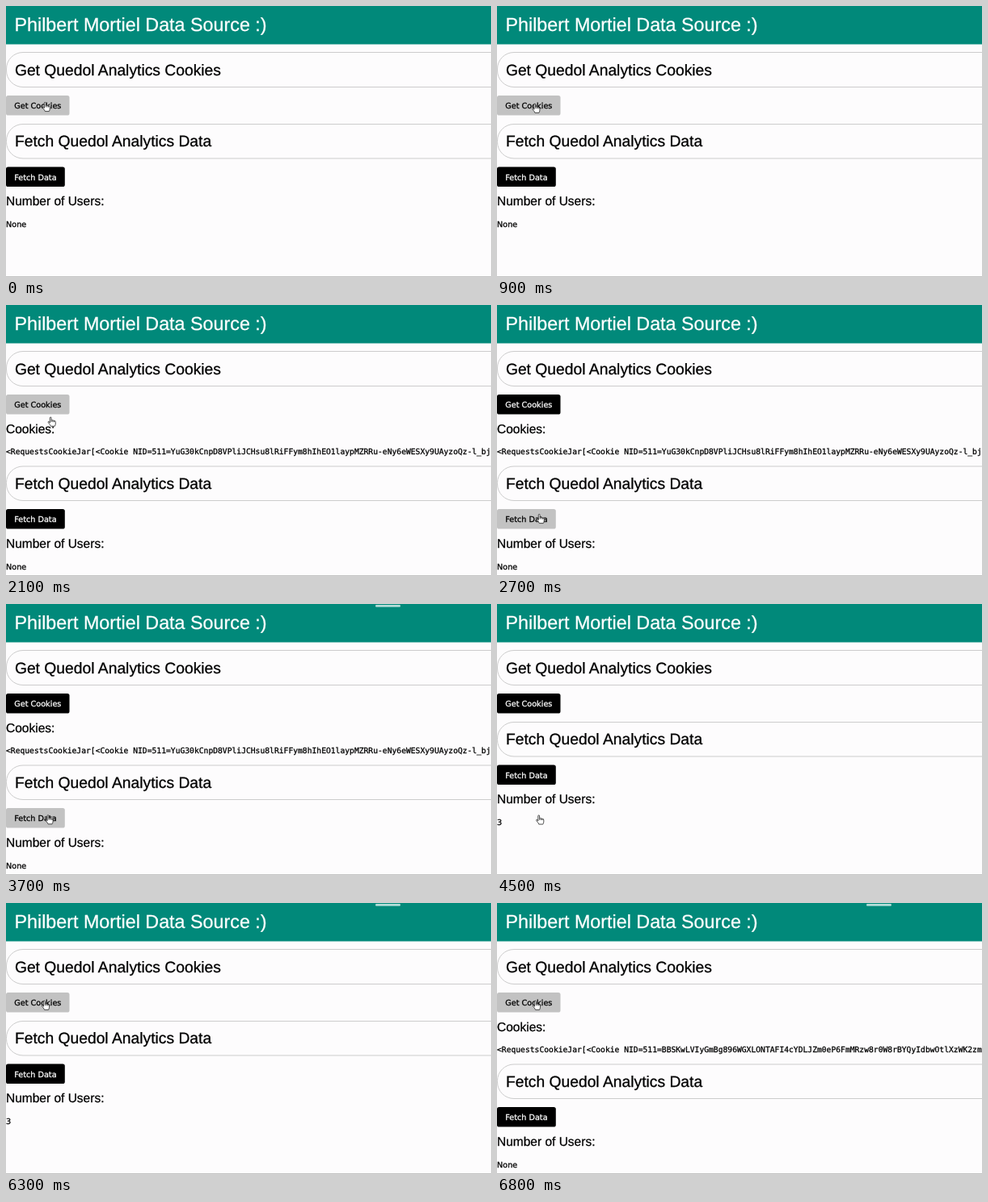
An HTML page for the animation above (6900 ms loop, 600 px wide and 336 px high).

```html
<!DOCTYPE html>
<html lang="en">
<head>
<meta charset="utf-8">
<title>Data source demo</title>
<style>
  html, body { margin: 0; width: 100%; height: 100%; overflow: hidden; background: #fdfcfd; }
  svg { display: block; width: 600px; height: 336px; color: #000; }
  text {
    font-family: "Liberation Sans", Arial, sans-serif; text-rendering: geometricPrecision; white-space: pre;
    fill: currentColor; stroke: currentColor; stroke-width: .28px;
  }
  .h1 { font-size: 23.3px; color: #fff; }
  .h2 { font-size: 19.3px; }
  .h3 { font-size: 15.5px; }
  .body { font: 9.68px "DejaVu Sans", Verdana, sans-serif; }
  .code { font: 9.68px "DejaVu Sans Mono", monospace; }
  .card { fill: none; stroke: #ccc; }
  .button { color: #fff; }
  .button rect { fill: #000; }
  .button.hover { color: #000; }
  .button.hover rect { fill: #c2c2c2; }
</style>
</head>
<body>
<svg viewBox="0 0 600 336">
  <rect width="600" height="47.5" fill="#01897a"/>
  <text class="h1" x="10.5" y="31">Philbert Mortiel Data Source :)</text>
  <rect id="bar" x="457" y="1.1" width="31" height="2.6" rx="1.3" fill="#fff" fill-opacity=".7"/>

  <rect class="card" x=".5" y="57.5" width="640" height="43" rx="20.5"/>
  <text class="h2" x="10.9" y="85.7">Get Quedol Analytics Cookies</text>
  <g class="button" id="get">
    <rect y="111" width="78.5" height="24.6" rx="2.6"/>
    <text class="body" x="10.2" y="127">Get Cookies</text>
  </g>

  <g id="cookies">
    <text class="h3" x="0" y="158.7">Cookies:</text>
    <text class="code" id="jar" x="0" y="185.3"></text>
  </g>

  <g id="lower">
    <rect class="card" x=".5" y="146.5" width="640" height="42.5" rx="20.5"/>
    <text class="h2" x="10.9" y="174.3">Fetch Quedol Analytics Data</text>
    <g class="button" id="fetch">
      <rect y="199.4" width="72.8" height="24.6" rx="2.6"/>
      <text class="body" x="10.2" y="215.5">Fetch Data</text>
    </g>
    <text class="h3" x="0" y="247.4">Number of Users:</text>
    <text class="body" id="users" x="0" y="274.2"></text>
  </g>

  <path d="M0 335.5H600" stroke="#c4c4c4"/>
  <path id="hand" fill="#fff" stroke="#222" stroke-width=".8" stroke-linejoin="round"
    d="M-2.7 1.5V-4.6Q-2.7-5.6-1.8-5.6T-.9-4.6V-1.8Q.1-2.5.9-1.5Q1.9-2 2.6-1Q4.3-1.5 4.3.6V2.4Q4.3 4 3.3 5.6H-1.7Q-2.2 4-3.6 2.6L-4.8.8Q-5-.5-3.8-.1ZM-.9-1.8V.4M.9-1.5V.5M2.6-1V.6"/>
</svg>
<script>
const LOOP = 6900;
const $ = id => document.getElementById(id);

// [time, x, y] of the pointer
const path = [
  [0, 50, 125], [100, 50, 125], [300, 48.6, 126.8], [1800, 48.6, 126.8],
  [2100, 57, 144.5], [2200, 57, 160], [2600, 54, 264], [2900, 54, 267],
  [4500, 53.5, 267.5], [4600, 53.5, 266], [4900, 52, 150], [5100, 51, 127],
  [5300, 51, 122.8], [5900, 51, 122.8], [6100, 49.2, 126.8], [LOOP, 49.2, 126.8]
];

// [start, users, cookie value]
const first = "YuG30kCnpD8VPliJCHsu8lRiFFym8hIhEO1laypMZRRu-eNy6eWESXy9UAyzoQz-l_bjc";
const second = "BBSKwLVIyGmBg896WGXLONTAFI4cYDLJZm0eP6FmMRzw8r0W8rBYQyIdbwOtlXzWK2zmV";
const pages = [[0, "None", ""], [1700, "None", first], [3900, "3", ""], [6700, "None", second]];

// [start, end] of each loading bar
const loads = [[900, 2100], [3000, 4350], [6000, 7500]];

const clamp = v => Math.max(0, Math.min(1, v));
const within = (t, a, b) => t >= a && t < b;

function pointer(t) {
  const i = path.findIndex(p => p[0] > t);
  const [t0, x0, y0] = path[i - 1], [t1, x1, y1] = path[i];
  const k = (t - t0) / (t1 - t0);
  return [x0 + (x1 - x0) * k, y0 + (y1 - y0) * k];
}

function draw(now) {
  const t = now % LOOP;
  const [, users, cookie] = pages.findLast(p => p[0] <= t);
  $("users").textContent = users;
  $("cookies").style.display = cookie ? "" : "none";
  $("jar").textContent = "<RequestsCookieJar[<Cookie NID=511=" + cookie;
  $("lower").setAttribute("transform", `translate(0 ${cookie ? 53.5 : 0})`);

  $("get").classList.toggle("hover", t < 2200 || t >= 5080);
  $("fetch").classList.toggle("hover", within(t, 2570, 3900));
  $("bar").style.opacity = Math.max(...loads.map(([a, b]) => clamp(Math.min(t - a, b - t) / 200)));
  $("hand").setAttribute("transform", `translate(${pointer(t)})`);
  requestAnimationFrame(draw);
}
requestAnimationFrame(draw);
</script>
</body>
</html>
```
